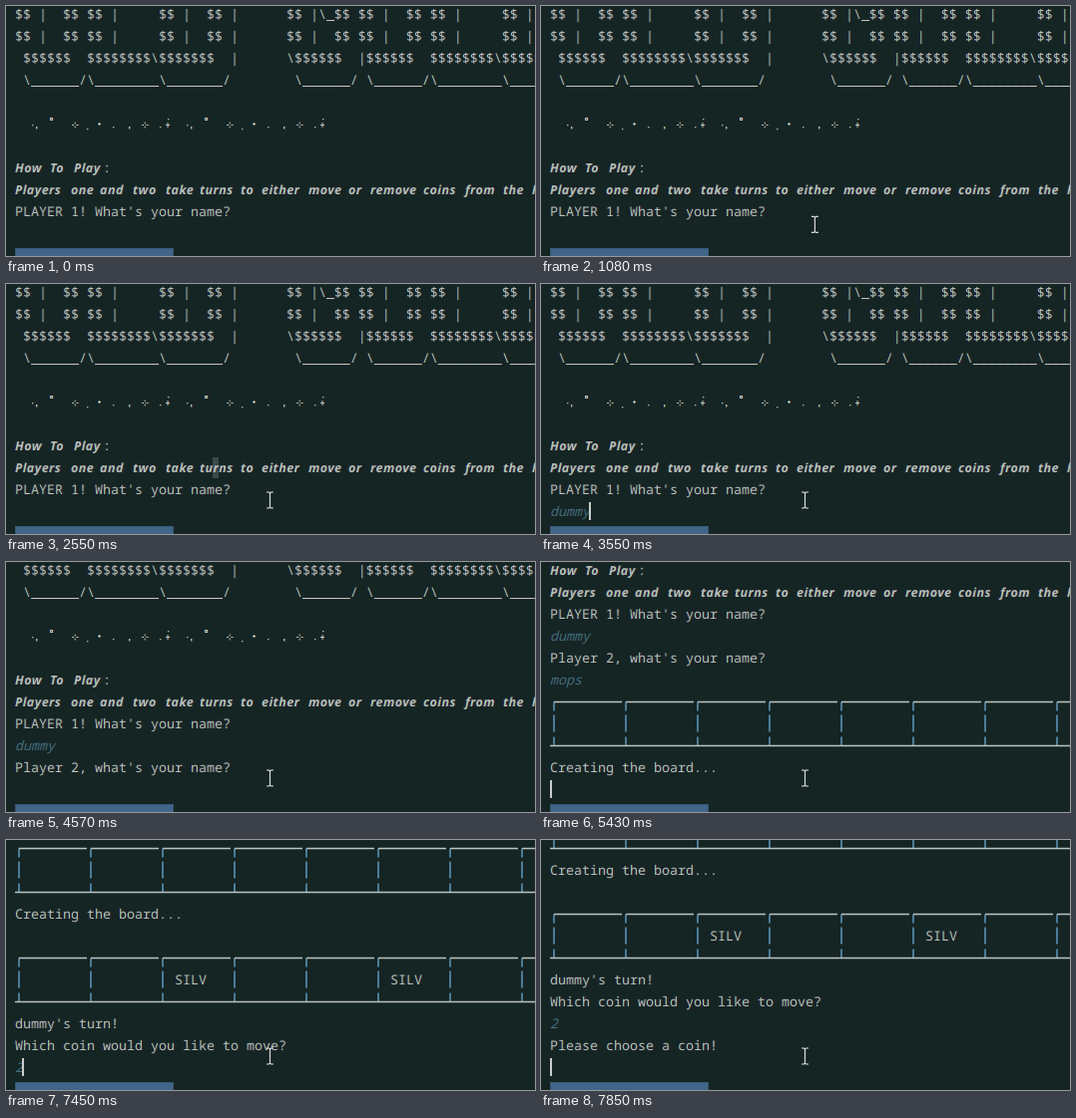
An HTML page for the animation above (8 s loop, 530 by 251 pixels).

```html
<!DOCTYPE html>
<html lang="en">
<head>
<meta charset="utf-8">
<title>Coin game console</title>
<style>
  html, body { margin: 0; width: 100%; height: 100%; overflow: hidden; background: #152524; }
  svg { display: block; width: 530px; height: 251px; }
  text {
    font: 13.333px "Noto Sans Mono", "DejaVu Sans Mono", monospace;
    fill: #c4c4c4; white-space: pre; text-rendering: geometricPrecision;
  }
  .rule { font: italic 700 12.5px "Open Sans", "Noto Sans", sans-serif; letter-spacing: .45px; }
  .typed { font-style: italic; fill: #467083; }
  .channel { mix-blend-mode: lighten; }
</style>
</head>
<body>
<svg id="stage" viewBox="0 0 530 251"></svg>
<script>
const LOOP = 8000, LEFT = 9, COL = 8, ROW = 22, INPUT_ROW = 10;
const stage = document.getElementById("stage");

function set(el, name, value) {
  if (el.getAttribute(name) !== String(value)) el.setAttribute(name, value);
}
function add(parent, tag, attrs = {}, content) {
  const el = document.createElementNS("http://www.w3.org/2000/svg", tag);
  for (const k in attrs) set(el, k, attrs[k]);
  if (content !== undefined) el.textContent = content;
  parent.appendChild(el);
  return el;
}
const rowY = row => 8 + row * ROW;
const colX = col => LEFT + col * COL;
const show = (el, on) => set(el, "visibility", on ? "visible" : "hidden");

add(stage, "rect", { width: 530, height: 251, fill: "#152524" });
const defs = add(stage, "defs");
const ink = add(defs, "g", { id: "ink" });
const plain = add(stage, "g");

// Subpixel text: one copy per colour channel, a third of a pixel apart
const layers = [{ el: plain, dx: 0 }];
[1 / 3, 0, -1 / 3].forEach((dx, channel) => {
  const keep = Array.from({ length: 20 }, (_, i) => +(i === channel * 6 || i === 18));
  const filter = add(defs, "filter", {
    id: "channel" + channel, filterUnits: "userSpaceOnUse", x: -10, y: -10, width: 560, height: 640,
    "color-interpolation-filters": "sRGB"
  });
  add(filter, "feColorMatrix", { values: keep.join(" ") });
  const el = add(stage, "use", { href: "#ink", class: "channel", filter: `url(#channel${channel})` });
  layers.push({ el, dx });
});

const parts = [];
function place(row, parent, tag, attrs, content) {
  const el = add(parent, tag, attrs, content);
  parts.push({ row, el });
  return el;
}
function write(row, str, x = LEFT, cls = "") {
  return place(row, ink, "text", { x, y: rowY(row) + 5, class: cls }, str);
}

[
  "$$ |  $$ $$ |     $$ |  $$ |      $$ |\\_$$ $$ |  $$ $$ |     $$ |",
  "$$ |  $$ $$ |     $$ |  $$ |      $$ |  $$ $$ |  $$ $$ |     $$ |",
  " $$$$$$  $$$$$$$$\\$$$$$$$  |      \\$$$$$$  |$$$$$$  $$$$$$$$\\$$$$$$$",
  " \\______/\\________\\_______/        \\______/ \\______/\\________\\_______/"
].forEach((line, row) => write(row, line));

// Sparkles, twice
const dot = (x, y, w = 1.3, h = 1.3) => `M${x} ${y}h${w}v${h}h${-w}z`;
const star = (x, y) => dot(x - 3, y, 2, 1) + dot(x + 1.5, y, 2, 1) +
  dot(x - .3, y - 2.5, 1, 2) + dot(x - .3, y + 1.5, 1, 2);
const sparkle =
  dot(26, 119) + dot(30, 121, 1.3, 2.5) + dot(44, 112, 3, 1) + dot(44, 114, 3, 1) +
  dot(44, 113, 1, 1) + dot(46, 113, 1, 1) +
  star(69, 119) + dot(81, 123) + dot(92, 118, 3, 1) + dot(93, 117, 1, 3) +
  dot(107, 121) + dot(123, 121, 1.3, 2.5) + star(139, 119) + dot(154, 121) +
  dot(160, 119, 4, 1) + dot(161.5, 117, 1, 5) + dot(162, 113);
for (const dx of [0, 155])
  place(5, ink, "path", { d: sparkle, transform: `translate(${dx})`, fill: "#cfcac0" });

// Rules
const words = (row, str, xs) => str.split(" ").forEach((w, i) => write(row, w, xs[i], "rule"));
words(7, "How To Play", [9, 44, 68]);
write(7, ":", colX(11));
words(8, "Players one and two take turns to either move or remove coins from the left",
  [9, 65, 94, 127, 160, 194, 235, 256, 303, 343, 365, 418, 460, 498, 527]);

// Boards
function board(top, coins) {
  const y = rowY(top) + .5;
  const line = (i, d, stroke) =>
    place(top + i, plain, "path", { d, stroke, "stroke-width": 1.4, fill: "none" });
  let lids = "", ups = ["", "", ""];
  for (let x = 13; x < 530; x += 72) {
    lids += `M${x} ${y}h68`;
    ups[0] += `M${x} ${y}v9`;
    ups[1] += `M${x} ${y + 13}v17`;
    ups[2] += `M${x} ${y + 35}v9`;
  }
  ups.forEach((d, i) => line(i, d, "#62a2c9"));
  line(0, lids, "#bcc3c0");
  line(2, `M9 ${y + 44}H530`, "#bcc3c0");
  for (const col of coins) write(top + 1, "SILV", colX(col));
}
board(13, []);
board(18, [20, 47]);

// Prompts
const one = "dummy", two = "mops";
write(9, "PLAYER 1! What's your name?");
write(11, "Player 2, what's your name?");
write(16, "Creating the board...");
write(21, one + "'s turn!");
write(22, "Which coin would you like to move?");
write(24, "Please choose a coin!");

// Typed answers: row, text, time of each key
const answers = [
  [10, one, [3020, 3220, 3280, 3420, 3550]],
  [12, two, [4630, 4760, 5030, 5160]],
  [23, "2", [7450]]
].map(([row, str, keys]) => ({
  row, str, keys,
  el: add(ink, "text", { x: LEFT, y: rowY(row) + 5, class: "typed" })
}));

// Text selection in the rules
const mark = add(plain, "rect", { x: 207, y: 174, width: 6, height: 21, fill: "#71868a", opacity: .38 });
const markCaret = add(plain, "rect", { x: 212, y: 176, width: 1.8, height: 17, fill: "#d0d3d0" });

const caret = add(plain, "rect", { width: 2, height: 18, fill: "#c9cecb" });
add(stage, "rect", { x: 9.5, y: 243.5, width: 158, height: 9, fill: "#406589", stroke: "#365872" });
const mouse = add(stage, "path", {
  d: "M-3.5-8h2.5l1 1l1-1h2.5M0-7V7M-3.5 8h2.5l1-1l1 1h2.5",
  stroke: "#d9dcda", "stroke-width": 1.2, fill: "none"
});

// Tables of steps: time, then values
const inputSteps = [[0, 10, 0], [3830, 12, 0], [5300, 13, 0], [5430, 17, 0], [5630, 21, 0],
  [5700, 23, 4], [5770, 23, 0], [7650, 24, 0], [7850, 25, 0]];
const caretSteps = [[0, 0], [3020, 1], [4570, 0], [4630, 1], [6580, 0], [7110, 1]];
const markSteps = [[0, 0, 0], [1540, 0, 1], [1610, 1, 1], [2550, 1, 0], [3020, 0, 0]];
const mouseSteps = [[1610, 212, 185], [1680, 213, 186], [1740, 232, 196], [1810, 255.5, 205],
  [1950, 259.5, 209], [2010, 262.5, 214], [2210, 264.5, 217]];
const at = (steps, t) => steps.reduce((a, s) => s[0] <= t ? s : a, steps[0]);

function mousePos(t) {
  if (t >= 1610) return at(mouseSteps, t).slice(1);
  const p = Math.floor((t - 810) / 72) / 11;
  const q = 1 - (1 - p) ** 2;
  return [330 - 118 * q, 250 - 65 * q];
}

function draw(t) {
  const [, input, slip] = at(inputSteps, t);
  const scroll = (INPUT_ROW - input) * ROW + slip;
  for (const { el, dx } of layers) set(el, "transform", `translate(${dx} ${scroll})`);
  for (const { el, row } of parts) show(el, row < input);

  let typed = 0;
  for (const a of answers) {
    const n = a.keys.filter(k => k <= t).length;
    const str = a.str.slice(0, n);
    if (a.el.textContent !== str) a.el.textContent = str;
    if (a.row === input) typed = n;
  }
  set(caret, "x", Math.max(LEFT, colX(typed) - 1));
  set(caret, "y", rowY(input) - 9);
  show(caret, at(caretSteps, t)[1]);

  const [, marked, blink] = at(markSteps, t);
  show(mark, marked);
  show(markCaret, blink);

  show(mouse, t >= 810);
  set(mouse, "transform", `translate(${mousePos(t)})`);
}

const start = performance.now();
function tick() {
  draw((performance.now() - start) % LOOP);
  requestAnimationFrame(tick);
}
tick();
</script>
</body>
</html>
```
